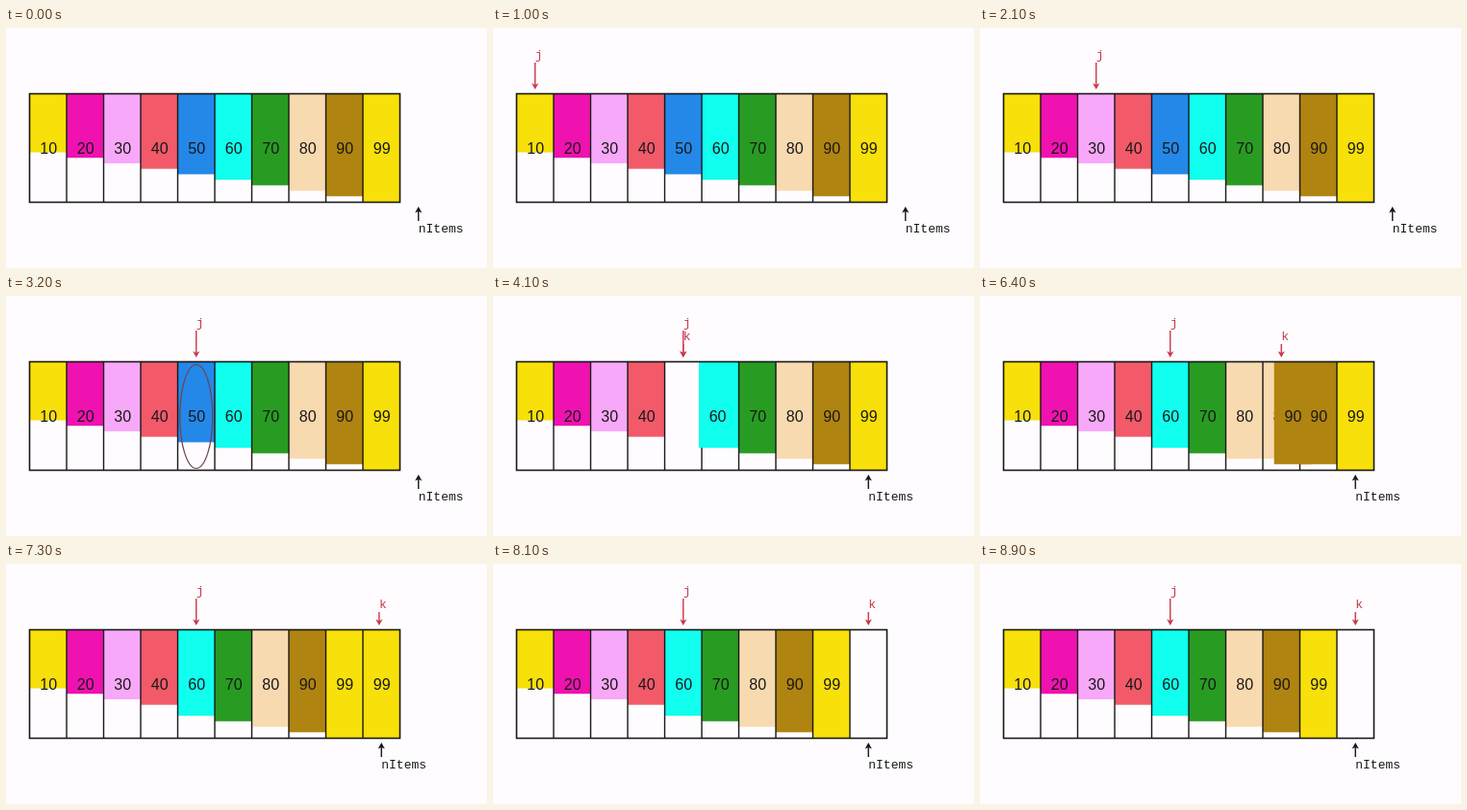
An HTML page with a canvas that plays this animation: 500x250 px, repeating every 9000 ms.

```html
<!DOCTYPE html>
<html lang="en">
<head>
<meta charset="utf-8">
<title>Deleting from an ordered array</title>
<style>
  html, body { margin: 0; width: 100%; height: 100%; overflow: hidden; background: #fefcfe; }
  canvas { display: block; }
</style>
</head>
<body>
<canvas id="stage" width="500" height="250"></canvas>
<script>
const ctx = document.getElementById('stage').getContext('2d');
const LOOP = 9000, TICK = 100;
const LEFT = 24.5, TOP = 68.5, CELL = 38.5, HEIGHT = 113;
const COLORS = ['#f8e00a', '#f012b0', '#f8a8f8', '#f25a6a', '#2488e8',
                '#10ffee', '#289c22', '#f8dab0', '#b08410', '#f8e00a'];
const PAPER = '#fefcfe', RED = '#c8384c', BLACK = '#181818';
const FOUND = 4, LAST = 9;

// Timeline in ms
const SEARCH = { show: 900, start: 1300, period: 450, move: 150 };
const CIRCLE = 2900;
const SHRINK = { start: 3350, move: 400 };
const LIFT = { start: 3800, move: 300 };
const SHIFT = { start: 4055, slide: 568, period: 650, move: 82 };
const CLEAR = 7700;

const progress = (t, start, length) => Math.min(1, Math.max(0, (t - start) / length));
const cellX = i => LEFT + CELL * i;
const centerX = i => cellX(i) + CELL / 2;

// Position after a series of short moves of one cell each
function stepped(t, start, period, move, count) {
  let position = 0;
  for (let i = 0; i < count; i++) position += progress(t, start + i * period, move);
  return position;
}

function line(x1, y1, x2, y2) {
  ctx.beginPath();
  ctx.moveTo(x1, y1);
  ctx.lineTo(x2, y2);
  ctx.stroke();
}

function bar(item, x, dy = 0) {
  ctx.fillStyle = COLORS[item];
  ctx.fillRect(x, TOP + dy, CELL, 61 + item * 5.72);
  ctx.fillStyle = BLACK;
  ctx.font = '16px "Liberation Sans", Arial, sans-serif';
  ctx.textAlign = 'center';
  ctx.fillText(item === LAST ? '99' : (item + 1) * 10, x + CELL / 2 + 0.4, 130.5 + dy);
}

function pointer(label, index, color, tail, tip, baseline) {
  const x = centerX(index), back = tip > tail ? -6.5 : 6.5;
  ctx.strokeStyle = ctx.fillStyle = color;
  ctx.lineWidth = 1.4;
  line(x, tail, x, tip + back / 2);
  ctx.beginPath();
  ctx.moveTo(x - 3.6, tip + back);
  ctx.lineTo(x, tip);
  ctx.lineTo(x + 3.6, tip + back);
  ctx.lineTo(x, tip + back * 0.75);
  ctx.closePath();
  ctx.fill();
  ctx.font = '13px "Liberation Mono", "Courier New", monospace';
  ctx.textAlign = 'left';
  ctx.fillText(label, x, baseline);
}

function grid() {
  ctx.strokeStyle = BLACK;
  ctx.lineWidth = 1.4;
  for (let i = 1; i <= LAST; i++) line(cellX(i), TOP, cellX(i), TOP + HEIGHT);
}

function draw(t) {
  ctx.fillStyle = PAPER;
  ctx.fillRect(0, 0, 500, 250);

  const lift = progress(t, LIFT.start, LIFT.move);
  const lifted = -160 * lift;
  let sliding = null;
  for (let i = 0; i <= LAST; i++) {
    let item = i;
    if (i >= FOUND && i < LAST) {
      const p = progress(t, SHIFT.start + (i - FOUND) * SHIFT.period, SHIFT.slide);
      if (p === 1) item = i + 1;
      else if (p > 0) sliding = { item: i + 1, x: cellX(i + 1 - p) };
    }
    const removed = item === FOUND && lift > 0;
    const cleared = i === LAST && t >= CLEAR;
    if (!removed && !cleared) bar(item, cellX(i));
  }

  grid();
  if (sliding) bar(sliding.item, sliding.x);
  if (lift > 0 && lift < 1) bar(FOUND, cellX(FOUND), lifted);
  ctx.strokeStyle = BLACK;
  ctx.lineWidth = 1.6;
  ctx.strokeRect(LEFT, TOP, CELL * 10, HEIGHT);

  if (t >= CIRCLE && lift < 1) {
    ctx.strokeStyle = '#70404e';
    ctx.lineWidth = 1.2;
    ctx.beginPath();
    ctx.ellipse(centerX(FOUND), 125.5 + lifted, 17, 54, 0, 0, Math.PI * 2);
    ctx.stroke();
  }

  pointer('nItems', 10 - progress(t, SHRINK.start, SHRINK.move), BLACK, 201, 186, 213);
  if (t >= SEARCH.show) {
    const j = stepped(t, SEARCH.start, SEARCH.period, SEARCH.move, FOUND);
    pointer('j', j, RED, 36, 64, 32);
  }
  if (t >= SHIFT.start) {
    const k = stepped(t, SHIFT.start + SHIFT.slide, SHIFT.period, SHIFT.move, LAST - FOUND);
    pointer('k', FOUND + k, RED, 50, 64, 46);
  }
}

function frame() {
  const t = performance.now() % LOOP;
  draw(Math.floor(t / TICK) * TICK);
  requestAnimationFrame(frame);
}
frame();
</script>
</body>
</html>
```
